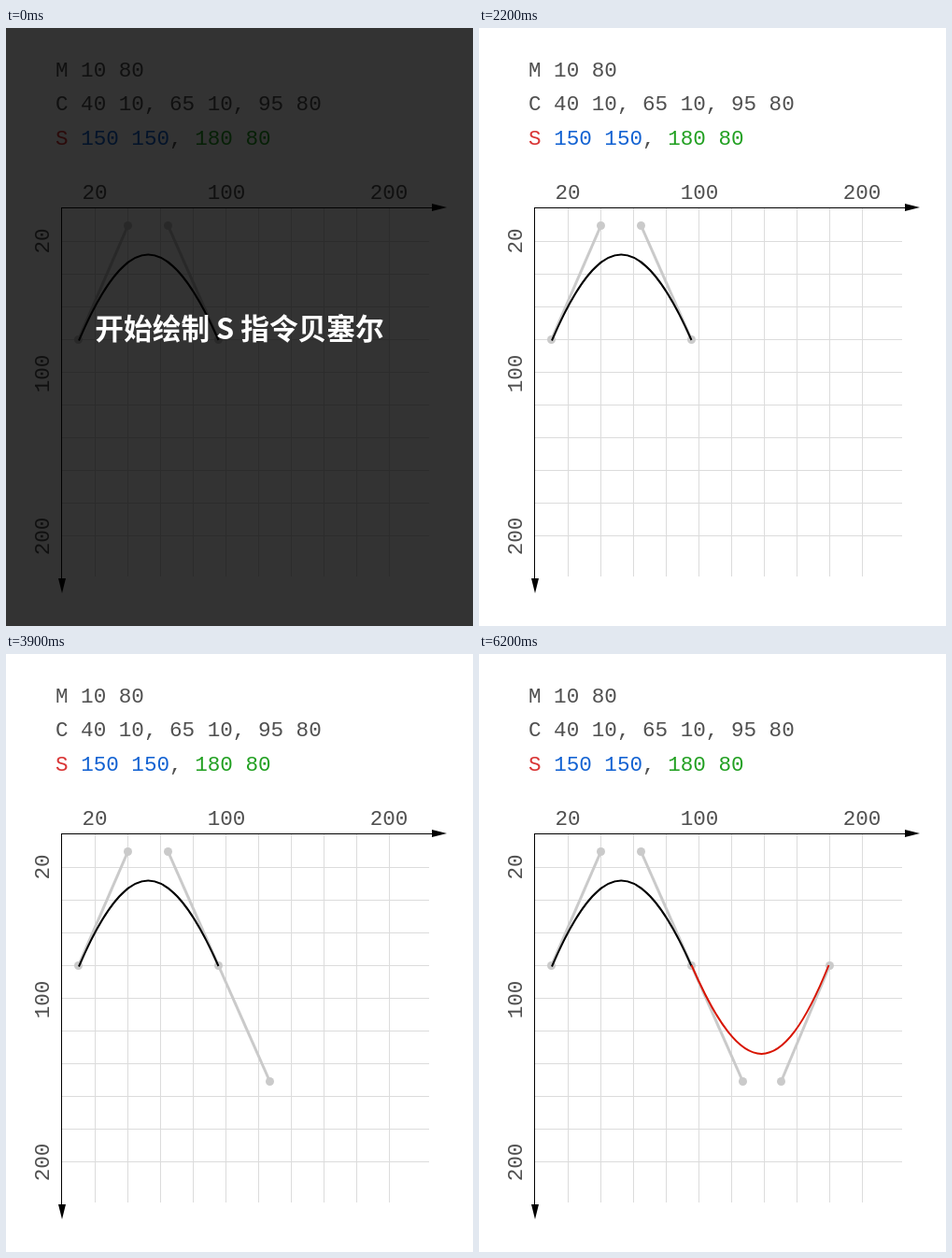
Animation, 500 px wide and 640 px high, one loop 7200 ms. Source, as an HTML page:

```html
<!DOCTYPE html>
<html lang="zh">
<head>
<meta charset="utf-8">
<title>S 指令贝塞尔</title>
<style>
  html, body { margin: 0; width: 100%; height: 100%; overflow: hidden; background: #fff; }
  svg { display: block; width: 500px; height: 640px; }
  .mono { font: 22.6px "Liberation Mono", monospace; fill: #505050; white-space: pre; }
  .title { font: bold 30.7px "Noto Sans CJK SC", "Noto Sans CJK", sans-serif; fill: #fff; }
  .mid { text-anchor: middle; }
</style>
</head>
<body>
<svg viewBox="0 0 500 640">
  <g id="grid" stroke="#dcdcdc"></g>
  <path d="M59.5 192V592M59 192.5H458" stroke="#000"/>
  <path d="M456 188L472 192L456 196ZM56 589L60 605L64 589Z"/>
  <g id="labels" class="mono mid"></g>
  <g class="mono">
    <text x="53" y="52">M 10 80</text>
    <text x="53" y="88">C 40 10, 65 10, 95 80</text>
    <text x="53" y="125"><tspan fill="#d93636">S</tspan> <tspan fill="#1262d2">150 150</tspan>, <tspan fill="#22a022">180 80</tspan></text>
  </g>
  <g id="handles" stroke-width="3"></g>
  <g id="dots"></g>
  <g fill="none" stroke-width="2">
    <path d="M78 334.5C130.500 212 173.500 212 227.500 334" stroke="#000"/>
    <path id="curve" d="M227.500 333C282.500 459.500 323.500 459.500 374.500 333" stroke="#d81400"/>
    <g id="markS" stroke="#d81400">
      <rect x="47" y="100" width="27" height="34" rx="3"/>
      <path d="M74 134L216 204M205 203.500L216 204L209 195.500"/>
    </g>
    <rect id="markControl" x="80" y="102" width="99" height="30" rx="3" stroke="#1262d2"/>
    <rect id="markEnd" x="201" y="103" width="86" height="29" rx="3" stroke="#22a022"/>
  </g>
  <g id="intro">
    <rect width="500" height="640" opacity=".8"/>
    <text class="title mid" x="250" y="333">开始绘制 S 指令贝塞尔</text>
  </g>
</svg>
<script>
const LOOP = 7200;
const GREY = '#cacaca', RED = '#d81400', BLUE = '#1262d2', GREEN = '#22a022';
const byId = id => document.getElementById(id);

function add(parent, tag, attrs, text = '') {
  const node = document.createElementNS('http://www.w3.org/2000/svg', tag);
  for (const name in attrs) node.setAttribute(name, attrs[name]);
  node.textContent = text;
  return byId(parent).appendChild(node);
}

for (let i = 0; i < 10; i++) {
  const x = 95.5 + 35 * i, y = 228.5 + 35 * i;
  add('grid', 'path', { d: `M${x} 193V587M60 ${y}H453` });
}
for (const [value, x, y] of [[20, 95, 228], [100, 236, 370], [200, 410, 544]]) {
  add('labels', 'text', { x, y: 183 }, value);
  add('labels', 'text', { transform: `translate(46 ${y}) rotate(-90)` }, value);
}

const points = {
  start: [77.5, 333.5], c1: [130.5, 211.5], c2: [173.5, 211.5], joint: [227.5, 333.5],
  mirror: [282.5, 457.5], control: [323.5, 457.5], end: [375.5, 333.5]
};
const dots = {};
for (const name in points) {
  const [cx, cy] = points[name];
  dots[name] = add('dots', 'circle', { cx, cy, r: 4.5 });
}
function handle(from, to) {
  const [x1, y1] = points[from], [x2, y2] = points[to];
  return add('handles', 'line', { x1, y1, x2, y2 });
}
const first = handle('start', 'c1');
const mirrored = handle('joint', 'mirror');
const second = handle('c2', 'joint');
const last = handle('end', 'control');

const show = (node, visible) => node.setAttribute('visibility', visible ? 'visible' : 'hidden');
const paintLine = (node, color) => node.setAttribute('stroke', color);
const paintDot = (name, color) => dots[name].setAttribute('fill', color);

function render(t) {
  const during = (from, to) => t >= from && t < to;
  const blink = during(2400, 3400) && Math.floor((t - 2400) / 200) % 2 === 0;
  const reflecting = during(3400, 3900);
  const placingControl = during(4100, 4600);
  const placingEnd = during(4800, 5300);

  show(byId('intro'), t < 1000);
  show(byId('markS'), during(1200, 2200));
  show(byId('markControl'), placingControl);
  show(byId('markEnd'), placingEnd);
  show(byId('curve'), t >= 6200);
  show(mirrored, t >= 3400);
  show(dots.mirror, t >= 3400);
  show(dots.control, t >= 4100);
  show(dots.end, t >= 4800);
  show(last, t >= 5500);

  paintLine(first, GREY);
  paintLine(second, blink ? RED : GREY);
  paintLine(mirrored, reflecting ? RED : GREY);
  paintLine(last, during(5500, 6000) ? RED : GREY);
  paintDot('start', GREY);
  paintDot('c1', GREY);
  paintDot('c2', blink ? RED : GREY);
  paintDot('joint', blink || reflecting ? RED : GREY);
  paintDot('mirror', reflecting ? RED : GREY);
  paintDot('control', placingControl ? BLUE : GREY);
  paintDot('end', placingEnd ? GREEN : GREY);
}

const began = performance.now();
function tick() {
  render((performance.now() - began) % LOOP);
  requestAnimationFrame(tick);
}
tick();
</script>
</body>
</html>
```
